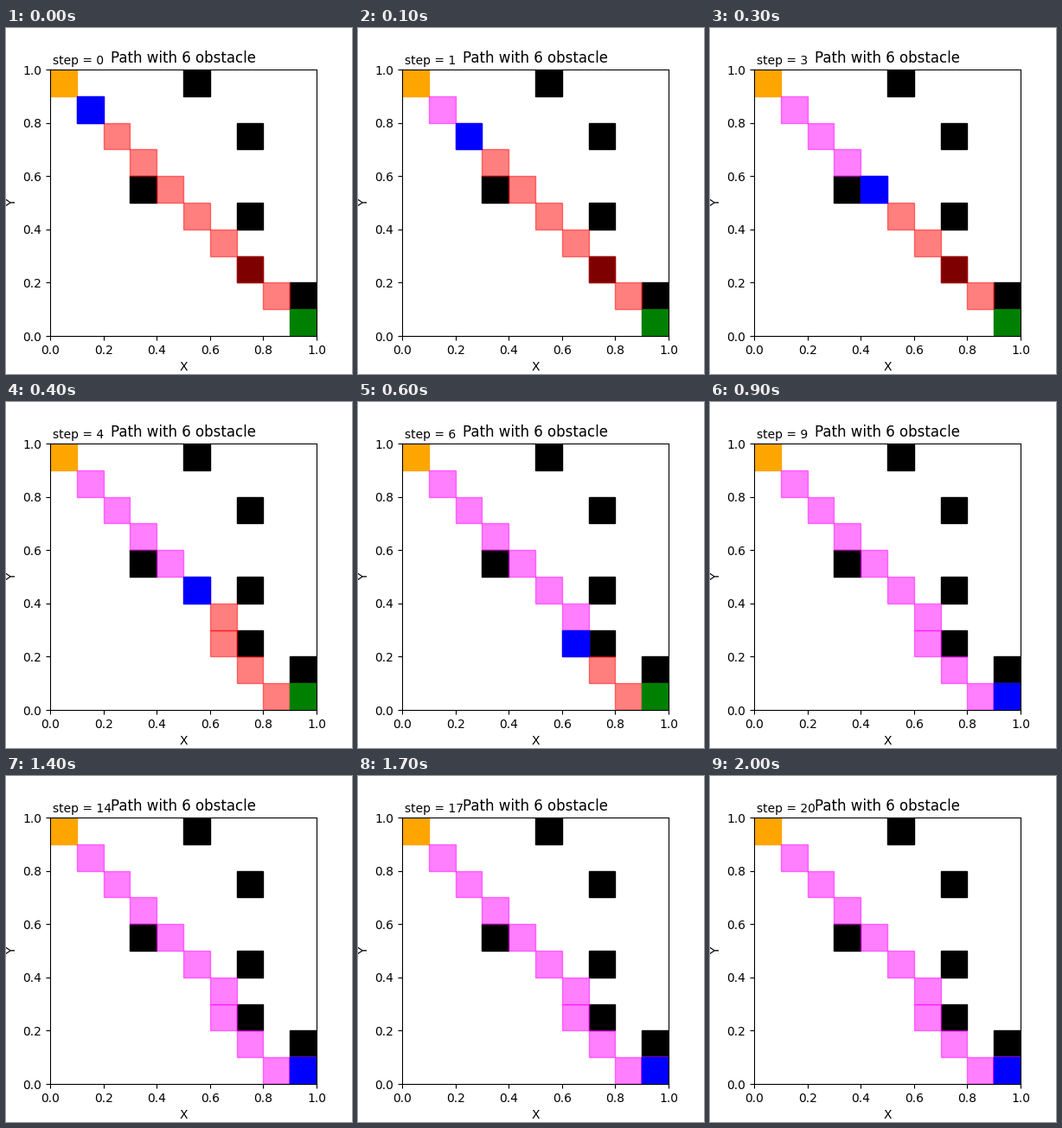
A matplotlib script that plays this animation: 400 by 400 pixels, repeating every 2.1 s.

```python
import matplotlib.pyplot as plt
from matplotlib.animation import FuncAnimation
from matplotlib.patches import Rectangle

STEPS = 21
CELL = 0.1
START, GOAL = (0, 9), (9, 0)
OBSTACLES = [(5, 9), (7, 7), (3, 5), (7, 4), (7, 2), (9, 1)]
HIDDEN = (7, 2)      # discovered on the way
REPLAN_STEP = 4

first_plan = [(i, 9 - i) for i in range(1, 10)]
route = first_plan[:6] + [(6, 2), (7, 1), (8, 0), GOAL]

fig, ax = plt.subplots(figsize=(4, 4), dpi=100)
ax.set_aspect("equal")
ax.set(xlim=(0, 1), ylim=(0, 1), xlabel="X", ylabel="Y")
ax.set_title(f"Path with {len(OBSTACLES)} obstacle")
label = ax.text(0.01, 1.02, "")


def add_cell(cell, color, alpha=None):
    x, y = cell
    return ax.add_patch(Rectangle((x * CELL, y * CELL), CELL, CELL,
                                  color=color, alpha=alpha))


for cell in OBSTACLES:
    add_cell(cell, "black")
add_cell(START, "orange")

moving = []


def update(step):
    while moving:
        moving.pop().remove()
    label.set_text(f"step = {step}")

    plan = first_plan if step < REPLAN_STEP else route
    here = min(step, len(route) - 1)
    for cell in plan[here + 1:-1]:
        moving.append(add_cell(cell, "red", 0.5))
    moving.append(add_cell(GOAL, "green"))

    # waiting on the goal keeps adding to the trail
    for i in range(step + 1):
        cell = route[min(i, len(route) - 1)]
        moving.append(add_cell(cell, "magenta", 0.5))
    moving.append(add_cell(route[here], "blue"))
    return moving + [label]


anim = FuncAnimation(fig, update, frames=STEPS, interval=100,
                     init_func=lambda: [], repeat=True, repeat_delay=0)
plt.show()
```
